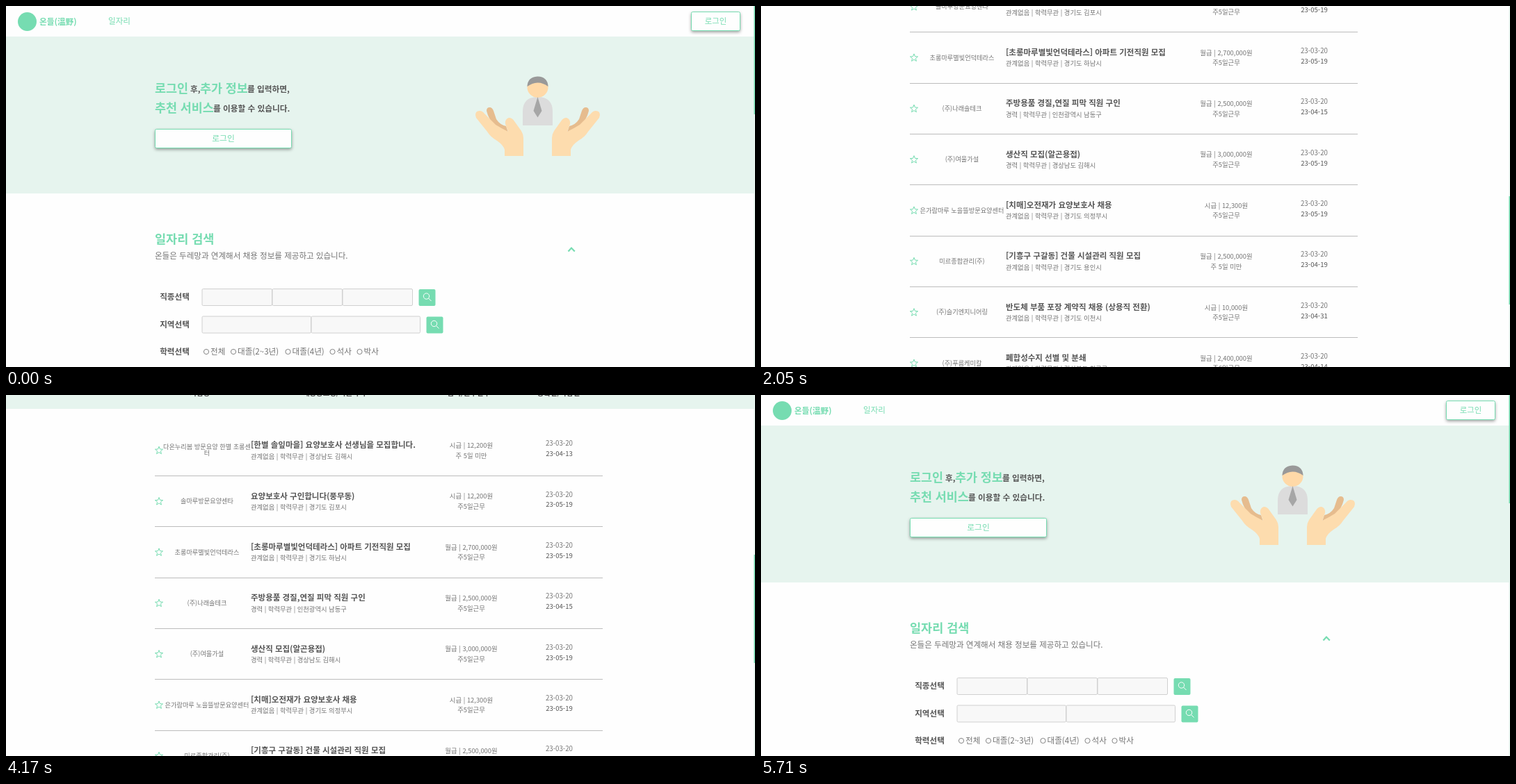
Recreate the animation shown at these times as an HTML page. Size 1077 by 520 pixels, loop 5.98 s.

```html
<!DOCTYPE html>
<html lang="ko">
<head>
<meta charset="utf-8">
<style>
  html, body { margin: 0; width: 100%; height: 100%; overflow: hidden; background: #fefefe; }
  svg { display: block; width: 1077px; height: 520px; }
  text { font-family: "Noto Sans CJK KR", "Noto Sans CJK", "Noto Sans", sans-serif; white-space: pre; }
  .raised { filter: drop-shadow(0 2px 2px rgba(0, 0, 0, .36)); }
</style>
</head>
<body>
<svg viewBox="0 0 1077 520" xmlns="http://www.w3.org/2000/svg">
  <g id="page"></g>
  <rect x="1075.500" width="1.500" height="520" fill="#e6f4ee"/>
  <rect id="thumb" x="1075.500" width="1.500" height="156" fill="#75dcb0"/>
</svg>
<script>
const GREEN = '#76dcb1', MINT = '#e6f4ee', DARK = '#555', GREY = '#747474', WHITE = '#fefefe';
const page = document.getElementById('page');
const thumb = document.getElementById('thumb');

function add(tag, attrs, parent = page) {
  const el = document.createElementNS('http://www.w3.org/2000/svg', tag);
  for (const key in attrs) el.setAttribute(key, attrs[key]);
  return parent.appendChild(el);
}
const rect = (x, y, width, height, fill, more) => add('rect', { x, y, width, height, fill, ...more });
const path = (d, fill, more, parent) => add('path', { d, fill, ...more }, parent);
const line = (d, stroke, width) => path(d, 'none', { stroke, 'stroke-width': width });

// cy is the optical middle of the line of text
function text(x, cy, size, str, fill = GREY, more) {
  add('text', { x, y: cy + size * .38, 'font-size': size, fill, ...more }).textContent = str;
}
const BOLD = { 'font-weight': 700 };
const MID = { 'text-anchor': 'middle' };
const BOLD_MID = { ...BOLD, ...MID };

function button(x, y, w, h, label, size, filled) {
  rect(x + .5, y + .5, w - 1, h - 1, filled ? GREEN : WHITE, { rx: 2, stroke: GREEN, class: 'raised' });
  text(x + w / 2, y + h / 2, size, label, filled ? WHITE : GREEN, MID);
}

function brand(logoX, cy, textX) {
  add('circle', { cx: logoX, cy, r: 13.5, fill: GREEN });
  text(textX, cy, 11.7, '온들(溫野)', GREEN, BOLD);
}

function drawHero() {
  brand(30.5, 22.5, 48);
  text(147, 22, 11.6, '일자리', GREEN);
  button(985, 8, 71, 28, '로그인', 11.4);
  rect(0, 44, 1077, 226, MINT);
  text(214, 118, 17.4, '로그인', GREEN, BOLD);
  text(265, 120, 11.6, '후,', DARK, BOLD);
  text(279, 118, 17.4, '추가 정보', GREEN, BOLD);
  text(347, 120, 11.7, '를 입력하면,', DARK, BOLD);
  text(214, 146, 17.4, '추천 서비스', GREEN, BOLD);
  text(298, 148, 11.7, '를 이용할 수 있습니다.', DARK, BOLD);
  button(214, 177, 197, 28, '로그인', 11.8);

  path('M743 172V152Q743 131 764.5 131T786 152V172Z', '#dcdcdc');
  add('circle', { cx: 764.5, cy: 117, r: 15, fill: '#ffd9a8' });
  path('M749.5 116Q750 102 764.5 101.500Q779 102 779.500 116Q765 105 749.500 116Z', '#999');
  path('M764.5 131L770.500 151L764.500 160.500L758.500 151Z', '#a6a6a6');
  for (const flip of ['', 'matrix(-1 0 0 1 1529 0)']) {
    const hand = add('g', { transform: flip });
    path('M691 151Q691 146 695.500 146Q699 146 701 151L705 163Q710 171 719 173L722 182L704 174Q694 164 691 151Z', '#e6bc8e', {}, hand);
    path('M675 157Q675 151 681 151Q685 151 688 155L704 171Q712 176 722 181L718 170Q717 163 723 161Q728 161 731 166' +
      'L741 180Q744 185 744 190V216H717V207Q715 200 706 194Q697 189 692 181L676 161Z', '#fddcae', {}, hand);
  }
}

function fields(y, width, count) {
  for (let i = 0; i < count; i++)
    rect(282 + i * width, y + .5, width - .5, 24, '#f8f8f8', { rx: 1.5, stroke: '#d0d0d0' });
  const x = 282 + width * count + 8.5;
  rect(x, y + 1, 24, 24, GREEN, { rx: 2 });
  add('circle', { cx: x + 11, cy: y + 11, r: 4.2, fill: 'none', stroke: WHITE });
  line(`M${x + 14} ${y + 14}l4 4`, WHITE, 1);
}

function radios(cy, options) {
  for (const [x, label] of options) {
    add('circle', { cx: x, cy, r: 3.6, fill: WHITE, stroke: '#777', 'stroke-width': .9 });
    text(x + 6, cy, 11.6, label);
  }
}

function drawSearch() {
  text(214, 335, 17.5, '일자리 검색', GREEN, BOLD);
  text(214, 360, 11.55, '온들은 두레망과 연계해서 채용 정보를 제공하고 있습니다.');
  line('M808.500 353.500L813 348.500L817.800 353.500', GREEN, 2.2);
  ['직종선택', '지역선택', '학력선택', '경력선택', '키워드'].forEach((label, i) =>
    text(242.5, 419 + i * 39.5, 11.6, label, DARK, BOLD_MID));
  fields(407, 101, 3);
  fields(446.5, 157, 2);
  radios(498, [[288, '전체'], [327, '대졸(2~3년)'], [405.5, '대졸(4년)'], [469.5, '석사'], [508.5, '박사']]);
  radios(537.5, [[288, '관계없음'], [348, '경력'], [387, '신입']]);
  rect(282, 566, 409.5, 23, WHITE, { rx: 2.5, stroke: '#858585' });
  button(446, 625, 85, 28.5, '검색', 11.7, true);
  button(542, 625, 85, 28.5, '초기화', 11.7);
}

const jobs = [
  ['다온누리봄 방문요양 한별 초롱센/터', '[한별 솔잎마을] 요양보호사 선생님을 모집합니다.', '관계없음', '경상남도 김해시', '시급 | 12,200', '주 5일 미만', '04-13'],
  ['솔마루방문요양센타', '요양보호사 구인합니다(풍무동)', '관계없음', '경기도 김포시', '시급 | 12,200', '주5일근무', '05-19'],
  ['초롱마루별빛언덕테라스', '[초롱마루별빛언덕테라스] 아파트 기전직원 모집', '관계없음', '경기도 하남시', '월급 | 2,700,000', '주5일근무', '05-19'],
  ['(주)나래솔테크', '주방용품 경질,연질 피막 직원 구인', '경력', '인천광역시 남동구', '월급 | 2,500,000', '주5일근무', '04-15'],
  ['(주)여울가설', '생산직 모집(알곤용접)', '경력', '경상남도 김해시', '월급 | 3,000,000', '주5일근무', '05-19'],
  ['은가람마루 노을뜰방문요양센터', '[치매]오전재가 요양보호사 채용', '관계없음', '경기도 의정부시', '시급 | 12,300', '주5일근무', '05-19'],
  ['미르종합관리(주)', '[기흥구 구갈동] 건물 시설관리 직원 모집', '관계없음', '경기도 용인시', '월급 | 2,500,000', '주 5일 미만', '04-19'],
  ['(주)슬기엔지니어링', '반도체 부품 포장 계약직 채용 (상용직 전환)', '관계없음', '경기도 이천시', '시급 | 10,000', '주5일근무', '04-31'],
  ['(주)푸름케미칼', '폐합성수지 선별 및 분쇄', '관계없음', '경상북도 칠곡군', '월급 | 2,400,000', '주6일근무', '04-14'],
  ['여백인쇄(주)', '패키지인쇄 기장/부기장급 모집', '경력', '경기도 김포시', '월급 | 3,000,000', '주5일근무', '04-18']
];

function star(cx, cy) {
  const points = Array.from({ length: 10 }, (_, i) => {
    const r = i % 2 ? 2.5 : 5.8, a = Math.PI * (i / 5 - .5);
    return `${cx + r * Math.cos(a)},${cy + r * Math.sin(a)}`;
  });
  add('polygon', { points: points.join(' '), fill: 'none', stroke: GREEN, 'stroke-linejoin': 'round' });
}

function drawJobs() {
  text(214, 724, 17.4, '전체공고', GREEN, BOLD);
  text(214, 749, 11.4, '온들(溫野)에 등록된 전체 공고입니다.');
  rect(0, 772, 1077, 42, MINT);
  [[278.5, '기업명'], [472, '채용공고명/지원자격'], [665.5, '급여/근무일수'], [794.5, '등록일/마감일']]
    .forEach(([x, label]) => text(x, 791.5, 10.4, label, DARK, BOLD_MID));

  jobs.forEach(([company, title, career, region, pay, days, due], i) => {
    const y = 866 + i * 73.35;
    star(220, y + 8);
    const lines = company.split('/');
    lines.forEach((part, k) => text(289, y + 7.5 + (k - (lines.length - 1) / 2) * 9, 9.2, part, GREY, MID));
    text(352, y, 11.5, title, DARK, BOLD);
    text(352, y + 16, 9.3, `${career} | 학력무관 | ${region}`);
    text(669, y + .5, 9.4, pay + '원', GREY, MID);
    text(669, y + 15, 9.4, days, GREY, MID);
    text(795.5, y - 2.5, 9.7, '23-03-20', GREY, MID);
    text(795.5, y + 12.5, 9.6, '23-' + due, DARK, { ...MID, 'font-weight': 500 });
    rect(214, Math.round(y + 44), 644, 1, '#bcbcbc');
  });
}

function drawFooter() {
  rect(511, 1588, 17, 17, GREEN);
  for (let n = 1; n <= 5; n++)
    text(486 + n * 16.9, 1597, 9.8, n, n === 2 ? WHITE : GREEN, MID);
  line('M469 1594l-3 3l3 3m3 -6l-3 3l3 3M489.500 1593l-7 4l7 4M584 1593l7 4l-7 4M601 1594l3 3l-3 3m3 -6l3 3l-3 3', GREEN, .9);
  rect(0, 1622, 1077, 170, MINT);
  brand(227, 1665, 245);
  ['대표 : 김가온 | 부대표 : 박누리', '주소 : 가람 솔빛구 은행나무중로 111', '고객상담 전화번호 : 1111-0000', '이메일 : DURUE @ mail.test']
    .forEach((row, i) => text(245, 1690.5 + i * 17.1, 8.85, row, '#666'));
}

const LOOP = 5980, BOTTOM = 1258, THUMB_RATIO = .2893;
// screen refreshes: [first, last, count]
const bursts = [
  [670, 1240, 9], [1300, 1850, 9], [1910, 2440, 9], [2520, 2780, 5],
  [3450, 4040, 10], [4100, 4640, 9], [4700, 5240, 9], [5310, 5570, 4]
];
const ticks = [0];
for (const [first, last, count] of bursts)
  for (let i = 0; i < count; i++)
    ticks.push(Math.floor((first + (last - first) * i / (count - 1)) / 10) * 10);

// [time, scroll position]
const knots = [
  [0, 0], [610, 0], [740, 75], [1090, 332], [1640, 658], [2380, 1172], [2520, 1234], [2780, BOTTOM],
  [3390, BOTTOM], [3520, 1195], [4160, 794], [4760, 418], [5240, 85], [5370, 25], [5570, 0], [LOOP, 0]
];
const slope = i => (knots[i + 1][1] - knots[i][1]) / (knots[i + 1][0] - knots[i][0]);
function tangent(i) {
  if (i === 0 || i === knots.length - 1) return 0;
  const a = slope(i - 1), b = slope(i);
  return a * b > 0 ? 2 * a * b / (a + b) : 0;
}

function scrollAt(t) {
  const i = Math.max(0, knots.findIndex(k => k[0] > t) - 1);
  const [t0, p0] = knots[i], [t1, p1] = knots[i + 1];
  const d = t1 - t0, u = (t - t0) / d, v = 1 - u;
  return v * v * (1 + 2 * u) * p0 + u * v * v * d * tangent(i)
    + u * u * (3 - 2 * u) * p1 - u * u * v * d * tangent(i + 1);
}

function render(time) {
  const tick = ticks.filter(t => t <= time).pop();
  const y = Math.round(scrollAt(tick));
  page.setAttribute('transform', `translate(0 ${-y})`);
  thumb.setAttribute('y', Math.round(y * THUMB_RATIO));
}

drawHero();
drawSearch();
drawJobs();
drawFooter();

const start = performance.now();
function frame() {
  render((performance.now() - start) % LOOP);
  requestAnimationFrame(frame);
}
render(0);
requestAnimationFrame(frame);
</script>
</body>
</html>
```
